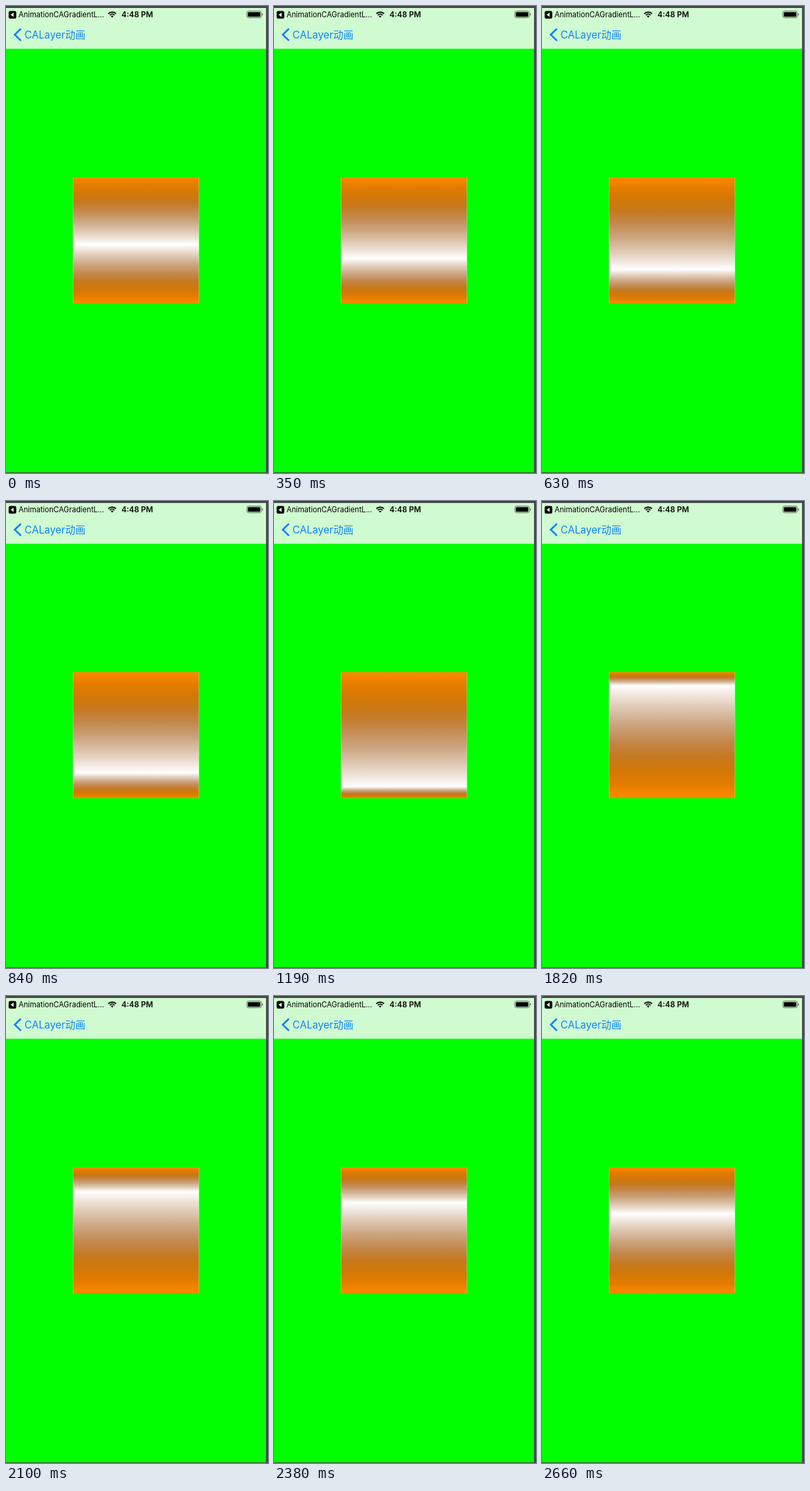
An HTML page that plays this animation: 396 px wide and 704 px high, repeating every 2.73 s.

```html
<!DOCTYPE html>
<html lang="en">
<head>
<meta charset="utf-8">
<title>Gradient sweep</title>
<style>
  html, body { margin: 0; width: 100%; height: 100%; overflow: hidden; background: #0f0; }
  svg { display: block; width: 100vw; height: 100vh; }
  text { font-family: Inter, "Noto Sans CJK SC", "Noto Sans CJK", sans-serif; }
</style>
</head>
<body>
<svg viewBox="0 0 396 704">
  <defs>
    <linearGradient id="sweep" x1="0" y1="0" x2="0" y2="1">
      <stop offset="0" stop-color="#ff8a00"/>
      <stop offset=".12" stop-color="#e47c00"/>
      <stop offset=".25" stop-color="#d17808"/>
      <stop offset=".37" stop-color="#c67920"/>
      <stop offset=".5" stop-color="#c3884c"/>
      <stop offset=".65" stop-color="#cba47e"/>
      <stop offset=".8" stop-color="#dec8b2"/>
      <stop offset=".9" stop-color="#eee2d7"/>
      <stop offset="1" stop-color="#fff"/>
    </linearGradient>
  </defs>

  <rect width="396" height="704" fill="#484848"/>
  <rect y="3" width="393" height="700" fill="#0f0"/>
  <rect y="3" width="393" height="61.5" fill="#d0fbd0"/>

  <!-- status bar -->
  <rect x="4" y="7.5" width="11.5" height="11.5" rx="2.5"/>
  <path d="M11.5 10v6.5L7 13.2z" fill="#fff"/>
  <text x="19" y="17" font-size="11.2">AnimationCAGradientL...</text>
  <g fill="none" stroke="#000" stroke-width="1.9">
    <path d="M154.6 11.6a8.4 8.4 0 0 1 11.8 0M156.9 13.9a5.1 5.1 0 0 1 7.2 0"/>
  </g>
  <path d="M160.5 17.6l-2-2a2.8 2.8 0 0 1 4 0z"/>
  <text x="174.5" y="17" font-size="11.6" font-weight="600">4:48 PM</text>
  <rect x="364" y="7.7" width="21.8" height="10" rx="2.6" fill="none" stroke="#4c5c4c" stroke-width=".9"/>
  <rect x="365.5" y="9.2" width="18.8" height="7" rx="1.3"/>
  <path d="M387 11v3.6q1.4-.5 1.4-1.8t-1.4-1.8z" fill="#4c5c4c"/>

  <!-- navigation bar -->
  <path d="M22.6 34.3L13.2 43.3L22.6 52.3" fill="none" stroke="#0a84ff" stroke-width="2.6"/>
  <text x="28" y="49" font-size="15.3" fill="#0a84ff">CALayer动画</text>

  <rect x="101.5" y="258" width="190" height="190" fill="#fff"/>
  <rect id="upper" width="1" height="1" fill="url(#sweep)"/>
  <rect id="lower" width="1" height="1" fill="url(#sweep)"/>
</svg>
<script>
  const LEFT = 101.5, TOP = 258, SIZE = 190;
  const LOOP = 2730, STEP = 70, START = 101.5, SPEED = 0.0597;
  const upper = document.getElementById('upper');
  const lower = document.getElementById('lower');

  function place(half, y, height) {
    half.setAttribute('transform', `translate(${LEFT} ${y}) scale(${SIZE} ${height})`);
  }

  // The white peak moves down at constant speed and wraps to the top.
  function draw(now) {
    const time = Math.floor((now % LOOP) / STEP) * STEP;
    const peak = (START + SPEED * time) % SIZE;
    place(upper, TOP, peak);
    place(lower, TOP + SIZE, peak - SIZE);
  }

  const begin = performance.now();
  function tick() {
    draw(performance.now() - begin);
    requestAnimationFrame(tick);
  }
  tick();
</script>
</body>
</html>
```
